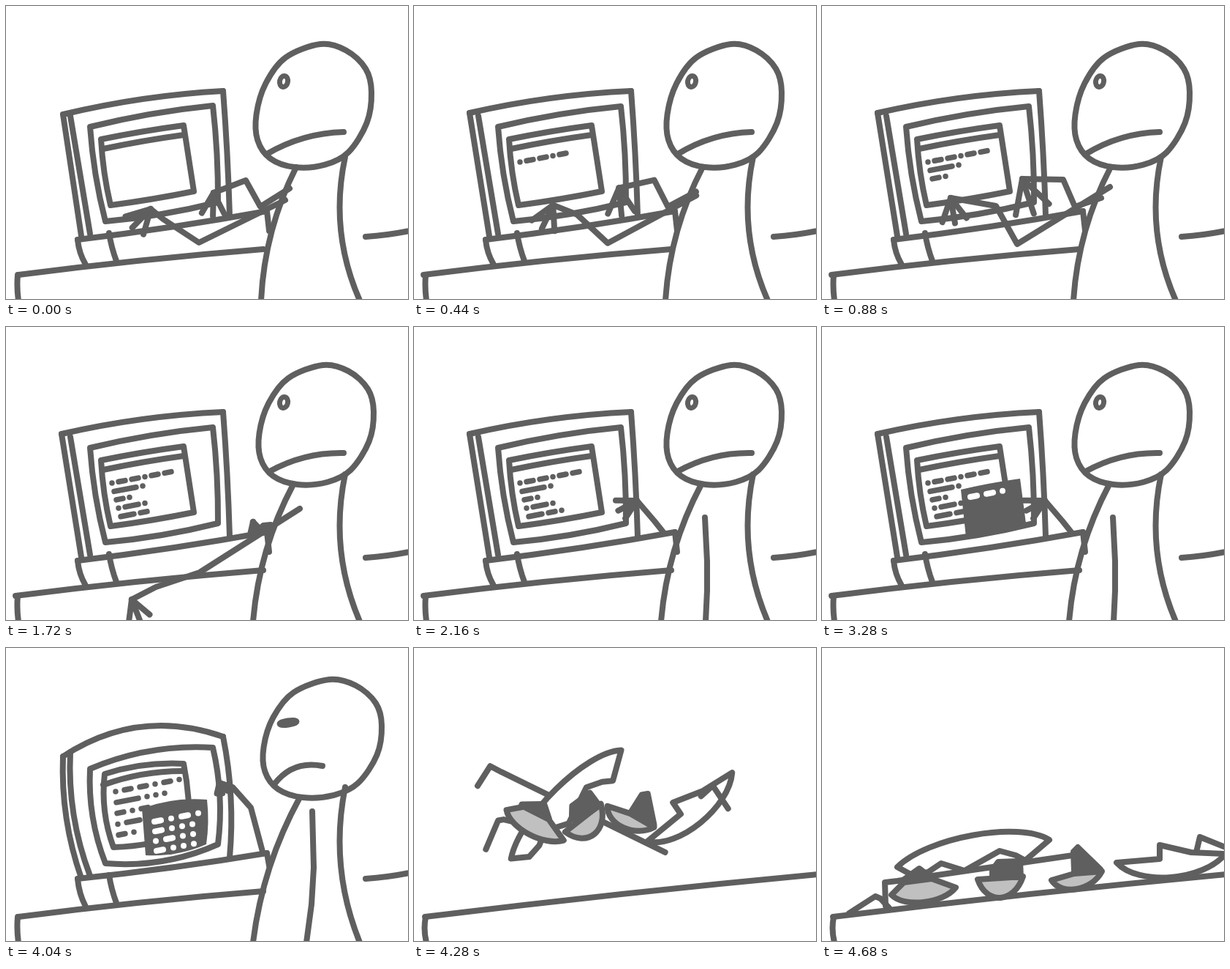
Recreate the animation shown at these times as an HTML page with a canvas. Size 550 by 400 pixels, loop 5 s.

```html
<!DOCTYPE html>
<html lang="en">
<head>
<meta charset="utf-8">
<title>Computer trouble</title>
<style>
html, body { margin: 0; width: 100%; height: 100%; overflow: hidden; background: #fff; }
canvas { display: block; }
</style>
</head>
<body>
<canvas id="stage" width="550" height="400"></canvas>
<script>
const ctx = document.getElementById('stage').getContext('2d');
const INK = '#5f5f5f', PALE = '#c0c0c0', WHITE = '#fff';
const LOOP = 5000, STEP = 40;

// Story beats, in steps.
const REACH = 42, POPUP = 77, SWELL = 88, FULL = 101, BURST = 106, LAND = 114, REST = 117;
const HOLDS = new Set([23, 47, 53, 57, 61, 65, 75, 79, 100]);

const clamp = (v, a = 0, b = 1) => Math.min(b, Math.max(a, v));
const lerp = (a, b, u) => a + (b - a) * u;
const mix = (a, b, u) => a.map((v, i) => lerp(v, b[i], u));
const pairs = p => p.flatMap((v, i) => i % 2 ? [] : [[v, p[i + 1]]]);

function pen(color = INK, width = 8) {
  ctx.strokeStyle = color;
  ctx.lineWidth = width;
}

// Continues to q, bulging to the left of travel by bow.
function bowTo([x1, y1], [x2, y2], bow) {
  const k = 2 * bow / (Math.hypot(x2 - x1, y2 - y1) || 1);
  ctx.quadraticCurveTo((x1 + x2) / 2 + (y2 - y1) * k, (y1 + y2) / 2 - (x2 - x1) * k, x2, y2);
}

function line(p, q, bow = 0) {
  ctx.beginPath();
  ctx.moveTo(...p);
  bowTo(p, q, bow);
  ctx.stroke();
}

function panel(corners, bows, fill) {
  ctx.beginPath();
  ctx.moveTo(...corners[0]);
  corners.forEach((p, i) => bowTo(p, corners[(i + 1) % 4], bows[i]));
  ctx.closePath();
  if (fill) {
    ctx.fillStyle = fill;
    ctx.fill();
  } else ctx.stroke();
}

function polyline(points) {
  ctx.beginPath();
  points.forEach(p => ctx.lineTo(...p));
  ctx.stroke();
}

// Closed Catmull-Rom curve.
function loop(points) {
  const n = points.length, at = i => points[(i + n) % n];
  ctx.beginPath();
  ctx.moveTo(...at(0));
  points.forEach((b, i) => {
    const a = at(i - 1), c = at(i + 1), d = at(i + 2);
    ctx.bezierCurveTo(
      b[0] + (c[0] - a[0]) / 6, b[1] + (c[1] - a[1]) / 6,
      c[0] - (d[0] - b[0]) / 6, c[1] - (d[1] - b[1]) / 6, ...c);
  });
  ctx.closePath();
  ctx.stroke();
}

// Scribbled text: one character per dot or dash.
const DASH = { '.': 0, '-': 9, '=': 18, '_': 30 };
function scribble(rows, x, y, indent, leading, gap, shown) {
  rows.forEach((row, i) => {
    let cx = x + i * indent;
    for (const ch of row) {
      if (shown-- < 1) return;
      const end = cx + DASH[ch], slope = v => y + i * leading - (v - x) * .19;
      line([cx, slope(cx)], [end, slope(end)]);
      cx = end + gap;
    }
  });
}

function drawComputer(beat, u) {
  pen();
  const top = [78 - 2 * beat, 148 - 2 * beat], right = [297, 116 + 5 * u];
  line(top, right, 5 + 22 * u);
  line(top, [103, 314], -8 * u);
  line([88, 150 - 8 * u], [115, 311], -9 * u);
  line(right, [306, 286], 1 + 5 * u);
  panel([[115, 165], [283, 136 + beat], [290, 268], [136, 294]], [3 + 7 * u, 2 + 4 * u, 3 + 7 * u, 3 + 4 * u]);

  line([98, 319 - 4 * u], [357, 280], -2);
  line([357, 280], [360, 307 - 10 * u]);
  line([98, 319 - 4 * u], [109, 353], -2);
  line([141, 310], [151, 348], -1);

  const left = 17 - 4 * beat;
  line([left, 367], [352, 332], 2);
  line([16, 367], [17, 402], -1);
  line([492, 315], [552, 307], -1);
}

function drawWindow(s, u) {
  pen();
  const a = [130 + 5 * u, 182 - 10 * u], b = [243, 163 - 5 * u];
  panel([a, b, [257 - 7 * u, 253], [143 + 4 * u, 272]], [1 + 4 * u, 3 * u, 1 + 3 * u, 2 + 4 * u]);
  line([133, 195 - 8 * u], [243, 176 - 8 * u], 1 + 4 * u);

  pen(INK, 7.5);
  if (s < 94) {
    const typed = s < 22 ? s * 10 / 22 : 10 + (s - 22) * 5 / 18;
    scribble(['.--.--', '_.', '-.', '.=.', '=-.'], 145, 213, 3, 12, 9, typed);
  } else {
    scribble(['.--.-.', '_...', '-.-', '.=', '-.'], 150, 196, 1, 15, 12, 99);
  }
}

function drawPopup(s, u) {
  panel([[190 - 4 * u, 222 - 3 * u], [271 + 4 * u, 207], [279 - 5 * u, 268], [197 - 6 * u, 287 - 4 * u]],
    [1 + 4 * u, 2 * u, 5 * u, 0], INK);
  pen(WHITE);
  if (s < 90) scribble(['--.'], 203, 232, 0, 0, 13, s - 79);
  else scribble(['-.-.', '-...', '.-..', '-...'], 203, 237, 1, 13.5, 14, 4 + (s - 90) * 12 / 11);
}

// Poses: head x, y, width, height, then front neck x and front foot x.
const typingMan = [[341, 52, 159, 168, 397, 349], [345, 52, 158, 168, 395, 344]];
const bashingMan = [[345, 53, 157, 167, 390, 340], [345, 52, 158, 163, 393, 338]];
const angryMan = [351, 43, 163, 161, 402, 338];
// Head outline in percent of its box.
const skull = pairs([56, 0, 78, 5, 95, 20, 100, 39, 96, 64, 80, 88, 60, 98, 34, 100, 13, 93, 2, 78, 1, 57, 9, 32, 26, 11]);

function drawMan([x, y, w, h, neck, foot], u) {
  const chin = y + h;
  pen();
  loop(skull.map(([px, py]) => [x + w * px / 100, y + h * py / 100]));
  line([x + 16, chin - 18], [462 - 29 * u, 172 - 11 * u], 7 + 4 * u);
  line([464, chin - 14], [484, 402], -16);
  line([neck, chin], [foot, 402], -10);
  pen(INK, 7);
  ctx.beginPath();
  ctx.ellipse(380 + 6 * u, 103 - u, lerp(5.5, 12, u), Math.max(2, lerp(7.5, 3, u)), lerp(.2, -.15, u), 0, 7);
  ctx.stroke();
}

// Arm poses: shoulder, elbow, wrist, knuckle, then finger angle and reach.
const leftArm = {
  press: [382, 265, 264, 323, 215, 291, 198, 277, 2.35, 36],
  lift: [394, 247, 267, 325, 238, 273, 176, 262, 1.4, 35],
  drop: [402, 248, 265, 335, 205, 355, 172, 372, 1.2, 32],
  hang: [398, 260, 401, 320, 401, 360, 399, 402, 1.5, 0],
  tense: [419, 223, 421, 300, 418, 350, 411, 402, 1.5, 0]
};
const rightArm = {
  press: [388, 249, 348, 274, 328, 238, 284, 255, 1.6, 32],
  lift: [382, 262, 346, 274, 330, 237, 274, 236, 1.25, 50],
  drop: [362, 270, 352, 271, 345, 277, 338, 266, 1.3, 15],
  raise: [337, 279, 318, 238, 322, 210, 310, 184, 1.5, 0],
  slap: [341, 280, 329, 265, 317, 251, 305, 237, 2.65, 29],
  tense: [351, 278, 335, 218, 310, 190, 292, 184, 1.3, 15]
};

function drawArm(pose) {
  const [angle, reach] = pose.slice(8), joints = pairs(pose.slice(0, 8));
  const [x, y] = joints[3];
  polyline(joints);
  if (reach > 1) for (const fan of [-.5, 0, .5]) {
    line([x, y], [x + reach * Math.cos(angle + fan), y + reach * Math.sin(angle + fan)]);
  }
}

function drawArms(s, u) {
  pen();
  if (s < REACH) {
    const m = [0, .65, 1, .35][s % 4];
    for (const arm of [leftArm, rightArm]) drawArm(mix(arm.press, arm.lift, m));
    return;
  }
  const fall = clamp((s - REACH - 1) / 7);
  const bash = .5 - .5 * Math.cos((s - 68) * Math.PI * 3 / 14);
  const swing = mix(rightArm.raise, rightArm.slap, bash);
  drawArm(mix(mix(leftArm.drop, leftArm.hang, fall), leftArm.tense, u));
  drawArm(mix(mix(rightArm.drop, swing, fall), rightArm.tense, u));
}

function drawScene(s) {
  const beat = Math.floor(s / 2) % 2;
  const u = clamp((s - SWELL) / (FULL - SWELL), 0, 1.4);
  drawComputer(beat, u);
  drawWindow(s, u);
  if (s >= POPUP) drawPopup(s, u);
  drawMan(mix((s < REACH ? typingMan : bashingMan)[beat], angryMan, u), u);
  drawArms(s, u);
}

// A shard runs from a to b along its teeth, then back along a curve of the given depth.
const shards = [
  { a: [37, 362], b: [92, 355], teeth: [73, 339, 80, 342], open: true },
  { a: [87, 352], b: [350, 282], teeth: [86, 320, 103, 318], open: true, loose: true },
  { a: [103, 299], b: [311, 262], teeth: [125, 311, 145, 306, 163, 294, 195, 304, 243, 277, 265, 283, 278, 290],
    depth: -25, fill: WHITE, loose: true },
  { a: [95, 337], b: [183, 327], teeth: [112, 320, 150, 315], depth: 15, fill: PALE, loose: true,
    soot: [108, 319, 133, 301, 150, 314] },
  { a: [213, 316], b: [275, 312], teeth: [], depth: 27, fill: PALE, loose: true,
    soot: [233, 313, 233, 303, 241, 292, 271, 291, 272, 313] },
  { a: [314, 317], b: [383, 305], teeth: [345, 308], depth: 18, fill: PALE, loose: true,
    soot: [344, 278, 350, 272, 381, 302, 345, 305] },
  { a: [403, 293], b: [552, 281], teeth: [462, 288, 462, 269, 505, 279], depth: 26, fill: WHITE },
  { a: [512, 279], b: [552, 272], teeth: [517, 258], open: true }
];

function drawShard({ a, b, teeth, depth, fill, open, soot }) {
  ctx.beginPath();
  [a, ...pairs(teeth), b].forEach(p => ctx.lineTo(...p));
  if (!open) {
    const [p, q] = [mix(b, a, .2), mix(b, a, .8)], dip = depth * 4 / 3;
    ctx.bezierCurveTo(p[0], p[1] + dip, q[0], q[1] + dip, ...a);
    ctx.closePath();
    ctx.fillStyle = fill;
    ctx.fill();
  }
  ctx.stroke();
  if (soot) {
    ctx.beginPath();
    pairs(soot).forEach(p => ctx.lineTo(...p));
    ctx.closePath();
    ctx.fillStyle = INK;
    ctx.fill();
    ctx.stroke();
  }
}

function drawWreck(s) {
  const left = 1 - clamp((s - BURST + 1) / (LAND - BURST));
  pen();
  line([15, 367], [552, 309], 2);
  line([16, 367], [17, 402], -2);
  shards.forEach((shard, i) => {
    const [x, y] = mix(shard.a, shard.b, .5);
    const shake = shard.loose && s >= LAND - 1 && s < REST ? 1.5 * Math.sin(s * 2.4 + i) : 0;
    ctx.save();
    ctx.translate(lerp(x, 210, left * .5) + shake, lerp(y, 190, left * .6) - 140 * left * (1 - left) + shake);
    ctx.rotate(left * (i % 2 ? .8 : -.8));
    ctx.translate(-x, -y);
    drawShard(shard);
    ctx.restore();
  });
}

const start = performance.now();
let last = -1;
function tick() {
  let s = Math.floor((performance.now() - start) % LOOP / STEP);
  if (HOLDS.has(s)) s--;
  if (s !== last) {
    last = s;
    ctx.fillStyle = WHITE;
    ctx.fillRect(0, 0, 550, 400);
    ctx.lineCap = ctx.lineJoin = 'round';
    if (s < BURST) drawScene(s);
    else drawWreck(s);
  }
  requestAnimationFrame(tick);
}
tick();
</script>
</body>
</html>
```
